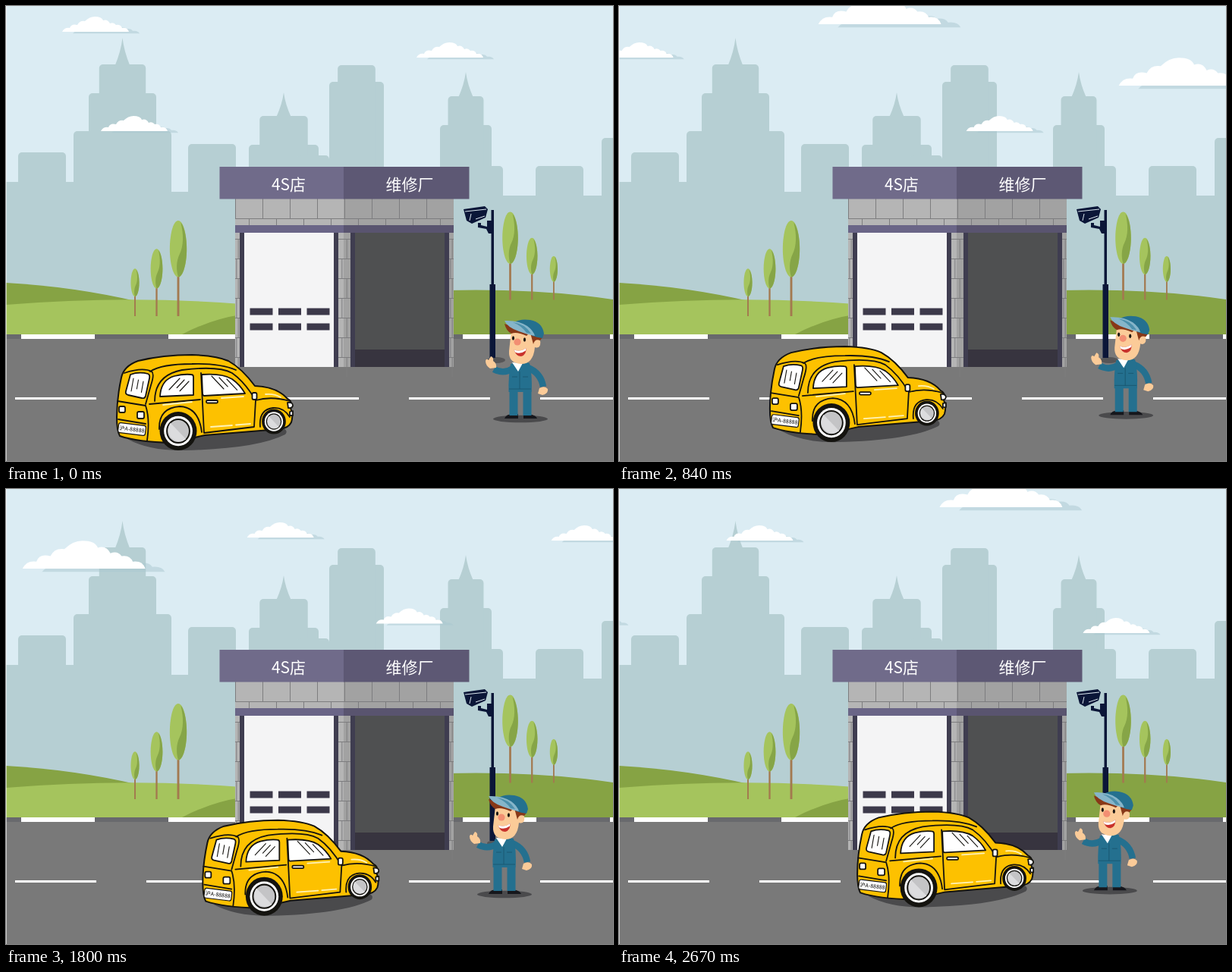
Recreate the animation shown at these times as an HTML page. Size 800 px wide and 600 px high, loop 2700 ms.

```html
<!DOCTYPE html>
<html lang="zh">
<head>
<meta charset="utf-8">
<style>
html, body { margin: 0; width: 100%; height: 100%; overflow: hidden; }
svg { display: block; width: 800px; height: 600px; }
text { font-family: "Noto Sans CJK SC", "Noto Sans CJK", "Noto Sans", sans-serif; text-anchor: middle; }
.line, .glass { fill: none; stroke: #14130f; stroke-width: 1.8; stroke-linecap: round; stroke-linejoin: round; }
.glass { fill: #fff; }
</style>
</head>
<body>
<svg viewBox="0 0 800 600">
  <defs>
    <path id="puff" d="M0 0Q3-6 10-5Q12-11 20-9Q23-15 30-14Q36-20 43-20Q52-20 54-15Q60-17 63-11Q68-13 71-9Q77-10 79-5Q86-6 88 0Z"/>
    <g id="cloud">
      <use href="#puff" transform="translate(14 2.300) scale(1 .7)" fill="#aac8d0" opacity=".5"/>
      <use href="#puff" fill="#fff"/>
    </g>
    <g id="leaf">
      <path fill="#a5c45d" d="M0-1C.65-1 1-.45 1 0C1 .55 .55 1 0 1S-1 .55-1 0C-1-.45-.65-1 0-1Z"/>
      <path fill="#86a547" d="M.3-.93C.8-.75 1-.35 1 0C1 .55 .55 1 0 1C-.25 .75-.25 .45 .15 .2C.65-.1 .65-.5 .3-.93Z"/>
    </g>
  </defs>

  <rect width="800" height="600" fill="#dbecf3"/>
  <g id="city" fill="#b6cfd3"><path d="M0 232H218V245H655V250H800V440H0Z"/></g>
  <g id="clouds"></g>

  <path fill="#86a344" d="M0 365Q90 370 175 390V433H0Z"/>
  <path fill="#a5c45d" d="M0 394Q160 381 310 393V433H0Z"/>
  <path fill="#86a344" d="M232 433Q270 413 310 407V433ZM580 375Q700 372 800 387V433H580Z"/>
  <g id="trees"></g>

  <rect y="439" width="800" height="161" fill="#797979"/>
  <rect y="433" width="800" height="6" fill="#68696d"/>
  <path stroke="#fff" stroke-width="6" stroke-dasharray="97 97" d="M20 436H800"/>
  <path stroke="#fff" stroke-width="3" stroke-dasharray="107 66" d="M12 517.500H800"/>

  <g id="shop">
    <path fill="#b5b5b5" d="M302 254H445V476H302Z"/>
    <path fill="#a2a2a2" d="M445 254H590V476H445Z"/>
    <path id="bricks" fill="none" stroke="#7d7d7f"/>
    <path fill="#6a6587" d="M302 289H445V299H302Z"/>
    <path fill="#59546f" d="M445 289H590V299H445Z"/>
    <path fill="#3f3d50" d="M308 299H438V476H308ZM454 299H584V476H454Z"/>
    <path fill="#f4f4f5" d="M314 299H432V476H314Z"/>
    <path fill="#4f5051" d="M460 299H578V476H460Z"/>
    <path fill="#37343f" d="M460 453H578V476H460Z"/>
    <path stroke="#3c394a" stroke-width="9" stroke-dasharray="30 7.500" d="M321.500 403H427M321.500 423H427"/>
    <path fill="#706b8a" d="M281.500 212H446V254.500H281.500Z"/>
    <path fill="#5d5874" d="M445 212H610.500V254.500H445Z"/>
    <g fill="#fff" font-size="21"><text x="372.500" y="243">4S店</text><text x="532" y="243">维修厂</text></g>
  </g>

  <g id="camera" fill="#0b1638">
    <ellipse cx="646" cy="467" rx="12" ry="4" fill="#565658"/>
    <path d="M639.500 269H643V367H645V464H637.500V367H639.500Z"/>
    <path d="M634 283H642V300H636L633 294L622 292V286H626V289L634 291Z"/>
    <path d="M603 268L631 264L635 268L632 279L614 287L607 283Z"/>
    <path fill="none" stroke="#dbe6ee" d="M605 271L633 268M613 274L611 283M619 281L631 277"/>
  </g>

  <g id="car">
    <path fill="#4a4a4c" d="M160 571Q190 587 235 586Q330 584 368 565Q376 556 345 552Z"/>
    <path fill="#fdc100" stroke="#14130f" stroke-width="2" stroke-linejoin="round"
      d="M146 542Q146 518 152 490Q155 475 174 468Q207 460 245 460Q278 461 293 468Q311 478 328 501Q357 502 371 518Q378 521 375 530Q379 540 376 549Q372 557 360 558L262 566L218 576Q174 575 150 567Q146 560 146 542Z"/>
    <path class="line" d="M156 484Q180 476 192 482Q196 485 191 500L184 525M190 482Q205 472 245 472Q282 471 303 480M196 521Q196 487 232 480Q280 474 298 484Q315 496 329 520L327 555L261 563L257 484M147 521L184 527Q190 545 186 573M189 525L256 519M329 520Q350 514 374 521M202 558Q201 530 229 528Q254 529 258 562M335 555Q333 532 352 530Q366 529 374 542M148 545L184 551"/>
    <path class="glass" d="M164 486Q175 482 187 485Q190 486 189 491L184 514Q183 518 179 517L161 513Q157 512 158 508Z"/>
    <path class="glass" d="M203 515Q204 493 222 488Q234 485 244 486Q247 486 247 489V513Z"/>
    <path class="glass" d="M258 486Q285 484 298 492Q309 500 315 511L261 514Q259 514 259 510Z"/>
    <path id="glints" class="line" style="stroke-width:1.100"/>
    <path stroke="#fff3b8" stroke-width="1.800" stroke-linecap="round" fill="none" d="M270 555L298 553M303 552.500L322 551M207 526L245 522M284 517L313 515M342 512Q354 511 362 516"/>
    <rect class="glass" x="149" y="528" width="8" height="8" rx="2"/>
    <rect class="glass" x="173" y="535" width="9" height="9" rx="2"/>
    <rect class="glass" x="264" y="520" width="15" height="3.500" rx="1.500"/>
    <rect class="glass" x="324.500" y="510" width="6" height="9" rx="2"/>
    <path class="glass" d="M371 523Q378 522 378 527Q377 531 372 530ZM374 535L378 534V540H374Z"/>
    <g transform="rotate(7 166 558)">
      <rect class="glass" x="148" y="551.500" width="36" height="13" rx="2.500" style="stroke-width:1.200"/>
      <text x="166" y="560.700" font-size="7">沪A-88888</text>
    </g>
    <g id="wheels"></g>
  </g>

  <g id="man">
    <ellipse cx="678" cy="544.500" rx="36" ry="4.800" fill="#4a4a4c"/>
    <path fill="#16171c" d="M657 544Q659 538 668 538H675V544ZM682 538H690Q699 540 700 544H682Z"/>
    <path fill="none" stroke="#24708f" stroke-width="11" d="M669 500V540M687 500V540"/>
    <path fill="none" stroke="#24708f" stroke-width="8.500" stroke-linejoin="round" d="M668 478Q656 486 643 479M688 477Q705 484 708 502"/>
    <path fill="#24708f" d="M665 472Q678 467 690 471Q694 488 692.500 509H662.500Q662 488 665 472Z"/>
    <path fill="none" stroke="#1a5872" d="M663 505H692M677 482V505M667 489H674M681 489H688"/>
    <path fill="#fbcb98" d="M646 477L638 478Q632 474 632 468Q633 464 636 467L639 462Q643 463 642 468Q647 471 646 477ZM703 504Q710 500 714 505Q715 511 707 513L701 511Z"/>
    <path fill="#fff" d="M667 470L681 471L675 482Z"/>
    <path fill="#fbcb98" d="M666 428Q688 428 697 437Q706 438 704 447Q702 452 697 450Q695 472 679 472Q662 471 663 455Z"/>
    <path fill="#883818" d="M657 419L690 431L686 435Q673 429 666 432Q659 428 657 419ZM691 431L707 437L704 441Q697 438 695 446Z"/>
    <g fill="#1c1714"><ellipse cx="668.500" cy="438" rx="1.600" ry="2.800"/><ellipse cx="683.500" cy="440" rx="1.600" ry="2.800"/></g>
    <circle cx="674" cy="443" r="4.600" fill="#f28e72"/>
    <path fill="#c8322c" d="M669.500 453Q677 457 685.500 451Q686 460 679 462Q672 462 669.500 453Z"/>
    <path fill="#fff" d="M669.500 453Q677 457 685.500 451L685 454.500Q677 460 671 456.500Z"/>
    <path fill="#24708f" d="M670 417Q678 412 691 414Q707 417 709 432L707 438Q692 436 684 429Z"/>
    <path fill="#86b5c9" d="M657 415Q675 414 687 422Q695 428 697 435Q686 433 676 429Q661 424 657 415Z"/>
    <path fill="#4c90ac" d="M668 417Q684 419 692 432L686 431Q680 422 668 417Z"/>
  </g>
  <rect width="1" height="600" fill="#fff" opacity=".6"/>
</svg>
<script>
const $ = id => document.getElementById(id);
const add = (id, markup) => $(id).insertAdjacentHTML('beforeend', markup);

// Each tier of a tower is narrower and rises less than the one below
function tower(x, width, top, tiers = 1, rise = 0, spire = 0) {
  for (let i = 0; i < tiers; i++, width *= .69, top -= rise, rise *= .76)
    add('city', `<rect x="${x - width / 2}" y="${top}" width="${width}" height="${400 - top}" rx="5"/>`);
  if (!spire) return;
  const base = top + rise / .76;
  add('city', `<path d="M${x - 10} ${base + 2}Q${x - 2} ${base - spire / 2} ${x} ${base - spire}Q${x + 2} ${base - spire / 2} ${x + 10} ${base + 2}Z"/>`);
}
tower(47.5, 63, 193);
tower(153.5, 129, 165, 3, 50, 35);
tower(271.5, 63, 182);
tower(366, 92, 183, 2, 38, 31);
tower(405, 42, 197);
tower(462, 72, 100, 2, 22);
tower(606, 68, 157, 2, 38, 32);
tower(620, 70, 211);
tower(729.5, 63, 211);
tower(816, 62, 174);

// Three trees, each about 0.7 of the one before
function grove(x, spacing, ground, height) {
  for (let i = 0; i < 3; i++, x += spacing, height *= .705) {
    const ry = height * .295, rx = ry * .3;
    add('trees', `<path stroke="#a3794f" stroke-width="${rx / 6 + 1}" d="M${x} ${ground - height / 2}V${ground}"/>
      <use href="#leaf" transform="translate(${x} ${ground - height + ry}) scale(${rx} ${ry})"/>`);
  }
}
grove(227, -28.5, 409, 126);
grove(664.5, 28.7, 387.5, 116);

let bricks = 'M302 280.5H590';
for (let x = 302; x < 590; x += 36) bricks += `M${x + .5} 254V280M${x + 18.5} 280V289`;
for (let y = 307, odd = 0; y < 476; y += 26, odd ^= 1)
  for (const [x, width] of [[302, 6], [438, 16], [584, 6]])
    bricks += `M${x} ${y + .5}h${width}M${x + width * (odd ? .3 : .7)} ${y}v26`;
$('bricks').setAttribute('d', bricks);

// Slanted strokes on a window, alternately long and short
const glints = (x, y, gap, dx, dy) => [1, .7, .85].map((size, i) =>
  `M${x + gap * i} ${y + 2 * i}l${dx * size} ${dy * size}`).join('');
$('glints').setAttribute('d',
  glints(168, 491, 6.5, -3, 17) + glints(229, 491, 6, -14, 15) + glints(271, 488, 10, 16, 17));

function wheel(x, y, r) {
  add('wheels', `<g transform="translate(${x} ${y}) scale(${r * .96} ${r})">
    <circle r="1" fill="#14130f"/><circle r=".77" fill="#fff"/>
    <circle r=".61" fill="#c4c4c6" stroke="#14130f" stroke-width=".08"/>
    <path d="M-.42-.42L.42 .42A.6 .6 0 0 1-.42-.42Z" fill="#dcdcde"/></g>`);
}
wheel(227, 560.5, 25.5);
wheel(353, 548, 16.5);

// Cloud lanes: size, height of the n-th cloud's base, starting positions
const SPEED = .6635, LOOP = 2700, STEP = 30;
const lanes = [
  { size: 1, base: () => 34, xs: [74] },
  { size: 1.84, base: () => 24, xs: [820, 2194] },
  { size: 1.84, base: () => 105, xs: [1216] },
  { size: 1, base: n => n == 1 ? 64 : 68, xs: [541, 1512, 1913] },
  { size: 1, base: n => 165 + 12.5 * Math.max(0, n - 1), xs: [125, 1015, 1682, 2383] }
];
const clouds = lanes.flatMap(({ size, base, xs }) => xs.map((x, n) => {
  add('clouds', '<use href="#cloud"/>');
  return { node: $('clouds').lastChild, x, y: base(n), size };
}));

const move = (node, x, y, size = 1) =>
  node.setAttribute('transform', `translate(${x} ${y}) scale(${size})`);

function draw(now) {
  const t = Math.floor(now % LOOP / STEP) * STEP, p = t / LOOP;
  for (const { node, x, y, size } of clouds) move(node, x - SPEED * t, y, size);
  move($('car'), 170 * p, -35 * p);
  move($('man'), -31.5 * p, -15 * p);
  requestAnimationFrame(draw);
}
draw(performance.now());
</script>
</body>
</html>
```
